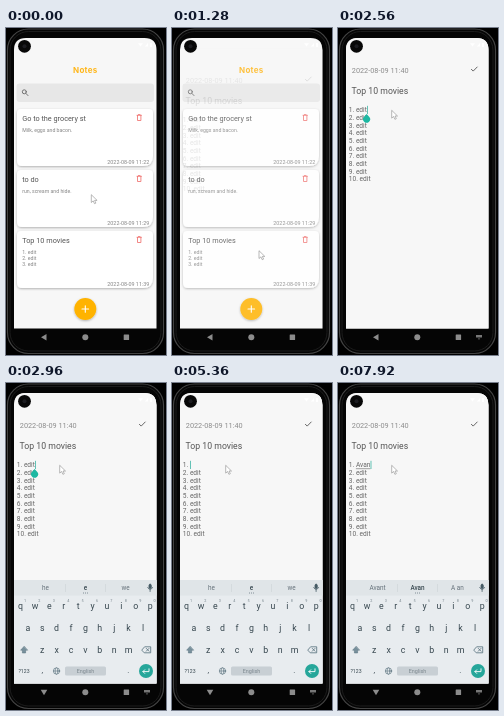
An HTML page for the animation above (8000 ms loop, 160 by 327 pixels).

```html
<!DOCTYPE html>
<html lang="en">
<head>
<meta charset="utf-8">
<title>Notes app</title>
<style>
html, body { margin: 0; width: 100%; height: 100%; overflow: hidden; background: #000; }
svg { display: block; width: 100vw; height: 100vh; font-family: Roboto, sans-serif; fill: #555; }
.line { fill: none; stroke-linecap: round; stroke-linejoin: round; }
.mid { text-anchor: middle; }
.end { text-anchor: end; }
</style>
</head>
<body>
<svg viewBox="0 0 160 327">
  <defs>
    <clipPath id="screen"><path d="M8 300.5V22Q8 10 20 10H138.5Q150.5 10 150.5 22V300.5Z"/></clipPath>
    <filter id="soft" x="-20%" y="-20%" width="140%" height="150%"><feDropShadow dx="0" dy=".9" stdDeviation=".9" flood-opacity=".3"/></filter>
    <g id="bin" class="line" stroke="#ef6a67" stroke-width=".8">
      <path d="M-2.2 -2.4H2.2M-.8 -3.1H.8M-1.7 -2.2V2.8H1.7V-2.2"/>
    </g>
  </defs>
  <rect width="160" height="327" fill="#000"/>
  <rect x="1.5" y="1" width="156" height="324.5" rx="21" fill="#050505" stroke="#444" stroke-width="1.2"/>
  <rect x="4" y="3.5" width="151" height="319.5" rx="18.5" fill="none" stroke="#1c1c1c"/>

  <g clip-path="url(#screen)">
    <rect x="7" y="10" width="145" height="291" fill="#f7f7f7"/>
    <g id="list">
      <text class="mid" x="79.3" y="45" font-size="8" font-weight="700" letter-spacing=".25" fill="#ffb619" style="font-family:Inter,sans-serif">Notes</text>
      <rect x="10.5" y="55.5" width="137.5" height="18.5" rx="3" fill="#e7e7e7"/>
      <g class="line" stroke="#666" stroke-width=".9"><circle cx="18.3" cy="63.8" r="2"/><path d="M19.9 65.4L22 67.6"/></g>
      <g id="cards"></g>
      <circle cx="79.3" cy="281" r="11" fill="#ffb300" filter="url(#soft)"/>
      <path class="line" d="M76 281H82.6M79.3 277.7V284.3" stroke="#fff" stroke-width="1.1"/>
    </g>
    <g id="note">
      <rect x="7" y="10" width="145" height="291" fill="#f7f7f7"/>
      <text x="13.8" y="44.6" font-size="7.3" fill="#8c8c8c">2022-08-09 11:40</text>
      <path class="line" d="M133.4 41.3L135.2 43.1L139.2 39" stroke="#555" stroke-width=".9"/>
      <text x="13.6" y="66" font-size="8.7">Top 10 movies</text>
      <g id="lines" font-size="6.6" fill="#666"></g>
      <path id="under" stroke="#666" stroke-width=".6"/>
      <rect id="caret" y="77.8" width=".8" height="8.2" fill="#3fb5a5"/>
      <path id="handle" d="M0 0L2.5 2.7A3.5 3.5 0 1 1 -2.5 2.7Z" fill="#1db8a2"/>
    </g>
    <path d="M132 15.2H137L134.5 18.5ZM139 18.5L142 15V18.5ZM144 15H146V19H144Z" fill="#fff"/>
    <g id="keyboard">
      <rect x="7" y="197" width="145" height="104" fill="#e8ecef"/>
      <rect x="7" y="197" width="145" height="15.5" fill="#e0e5e8"/>
      <g id="hints" class="mid" font-size="6.4" fill="#65717a"></g>
      <path d="M59.5 201V209M99.5 201V209" stroke="#ccd2d6" stroke-width=".6"/>
      <g class="line" stroke="#455a64" stroke-width=".8"><rect x="143" y="201.3" width="2.3" height="4.2" rx="1.1" fill="#455a64"/><path d="M141.7 204.5Q144.1 208.7 146.6 204.5M144.1 206.7V208.5"/></g>
      <g id="keys" class="mid" fill="#37474f"></g>
      <g class="line" stroke="#546e7a" stroke-width=".9">
        <path d="M18 263.4L14.6 267.2H16.4V270H19.6V267.2H21.4Z" fill="#78909c" stroke-width=".5"/>
        <path d="M136 266.8L138.6 263.8H144.7V269.8H138.6ZM140.3 265.4L143 268.2M143 265.4L140.3 268.2" stroke-width=".8"/>
        <g stroke-width=".6"><circle cx="50.5" cy="288" r="3.2"/><ellipse cx="50.5" cy="288" rx="1.4" ry="3.2"/><path d="M47.4 288H53.6"/></g>
      </g>
      <rect x="59" y="283.5" width="41" height="9" rx="1.5" fill="#c8cfd4"/>
      <text class="mid" x="79.5" y="290" font-size="5.4" fill="#7a868d">English</text>
      <circle cx="140" cy="288" r="7" fill="#26a69a"/>
      <path class="line" d="M143 285.8V288.6H137M138.7 286.8L136.9 288.6L138.7 290.4" stroke="#fff" stroke-width=".9"/>
    </g>
  </g>
  <circle cx="18.5" cy="18.3" r="6.4" fill="#080808"/>
  <circle cx="18.5" cy="18.3" r="2" fill="#1c1c20"/>

  <g fill="#8c8c8c">
    <path id="back" d="M-3 0L2.5 -3.3V3.3Z"/>
    <circle cx="79.3" cy="309.3" r="3"/>
    <rect x="117.7" y="306.6" width="5.4" height="5.4" rx=".5"/>
    <path id="switch" d="M138 307H144V309.6H138ZM139.7 310.4H142.3L141 311.8Z" fill="#777"/>
  </g>
  <path id="mouse" d="M0 0V7.8L1.9 6.2L3.2 9L4.6 8.4L3.3 5.7H5.8Z" fill="#fff" stroke="#8a8a8a" stroke-width=".6"/>
</svg>
<script>
const LOOP = 8000;
const $ = id => document.getElementById(id);
const text = (x, y, s, attrs = '') => `<text x="${x}" y="${y}" ${attrs}>${s}</text>`;
const show = (id, on) => $(id).setAttribute('visibility', on ? 'visible' : 'hidden');
const move = (id, x, y) => $(id).setAttribute('transform', `translate(${x} ${y})`);
const ramp = (t, a, b) => {
  const p = Math.min(1, Math.max(0, (t - a) / (b - a)));
  return p * p * (3 - 2 * p);
};
const mix = (a, b, p) => a + (b - a) * p;

const notes = [
  ['Go to the grocery st', ['Milk, eggs and bacon.'], '11:22'],
  ['to do', ['run, scream and hide.'], '11:29'],
  ['Top 10 movies', ['1. edit', '2. edit', '3. edit'], '11:39']
];
$('cards').innerHTML = notes.map(([title, body, time], i) =>
  `<g transform="translate(0 ${i * 61})">
    <path d="M15 81H143Q147 81 147 85V128Q147 138 137 138H16Q11 138 11 133V85Q11 81 15 81Z" fill="#fff" filter="url(#soft)"/>
    ${text(16.2, 93, title, 'font-size="7.3"')}
    ${body.map((s, j) => text(16.2, 103.6 + j * 6.3, s, 'font-size="5.2" fill="#858585"')).join('')}
    ${text(143.3, 136, '2022-08-09 ' + time, 'class="end" font-size="5.4" fill="#858585"')}
    <use href="#bin" x="133.2" y="89.7"/>
  </g>`).join('');

$('lines').innerHTML = Array.from({ length: 10 }, (_, i) =>
  text(10.8, 84.3 + i * 7.68, i + 1 + '. edit')).join('');
const first = $('lines').firstChild;

const rows = [['qwertyuiop', 14.6, 226], ['asdfghjkl', 21.8, 248], ['zxcvbnm', 36.2, 270]];
$('keys').innerHTML = rows.map(([row, x, y]) =>
  [...row].map((c, i) => text(x + i * 14.4, y, c, 'font-size="8.8"')).join('')).join('') +
  [...'1234567890'].map((c, i) => text(19 + i * 14.4, 218.5, c, 'font-size="3.8" fill="#78858d"')).join('') +
  text(18, 290, '?123', 'font-size="5.2"') + text(36.2, 290, ',', 'font-size="8"') + text(122.3, 290, '.', 'font-size="8"');

// Moments at which the first line's word takes a new value
const edits = [[0, 'edit'], [3200, 'edi'], [3360, 'ed'], [3520, 'e'], [3680, ''],
  [6160, 'A'], [6880, 'Av'], [7200, 'Ava'], [7520, 'Avan']];
let lastHints = '', lastWord = null;

function setHints(words) {
  const key = words.join();
  if (key === lastHints) return;
  lastHints = key;
  $('hints').innerHTML = words.map((w, i) =>
    text(39.5 + i * 40, 207.3, w, i === 1 ? 'font-weight="500" fill="#37474f"' : '')).join('') +
    '<path d="M77 210H82" stroke="#78858d" stroke-width=".9" stroke-dasharray="1 1"/>';
}

function draw(t) {
  const open = ramp(t, 1240, 1400);
  show('note', open > 0);
  $('note').setAttribute('opacity', open);
  move('note', 0, 12 * (1 - open));

  const down = ramp(t, 120, 800), up = ramp(t, 1760, 2320);
  move('mouse', mix(mix(85.3, 87, down), 53.7, up), mix(mix(166.7, 222.7, down), 82.3, up));

  const word = edits.filter(e => e[0] <= t).pop()[1];
  if (word !== lastWord) {
    first.textContent = '1. ' + word;
    lastWord = word;
  }
  const start = 10.8 + 6.6 * 1.07;
  const end = word ? 10.8 + first.getComputedTextLength() : start;
  $('caret').setAttribute('x', end + .2);
  $('under').setAttribute('d', t > 6160 ? `M${start} 85.7H${end}` : '');
  move('handle', 28.6, 86);
  const editing = open === 1 && t >= 2400;
  show('caret', editing);
  show('handle', editing && t < 3200);

  const rise = ramp(t, 2640, 2880);
  show('keyboard', rise > 0);
  move('keyboard', 0, 104 * (1 - rise));
  show('switch', t >= 2480);
  $('back').setAttribute('transform', `translate(38 309.3) rotate(${t >= 2640 ? -90 : 0})`);
  setHints(t < 7520 ? ['he', 'e', 'we'] : ['Avant', 'Avan', 'A an']);
}

function tick() {
  draw(performance.now() % LOOP);
  requestAnimationFrame(tick);
}
tick();
</script>
</body>
</html>
```
